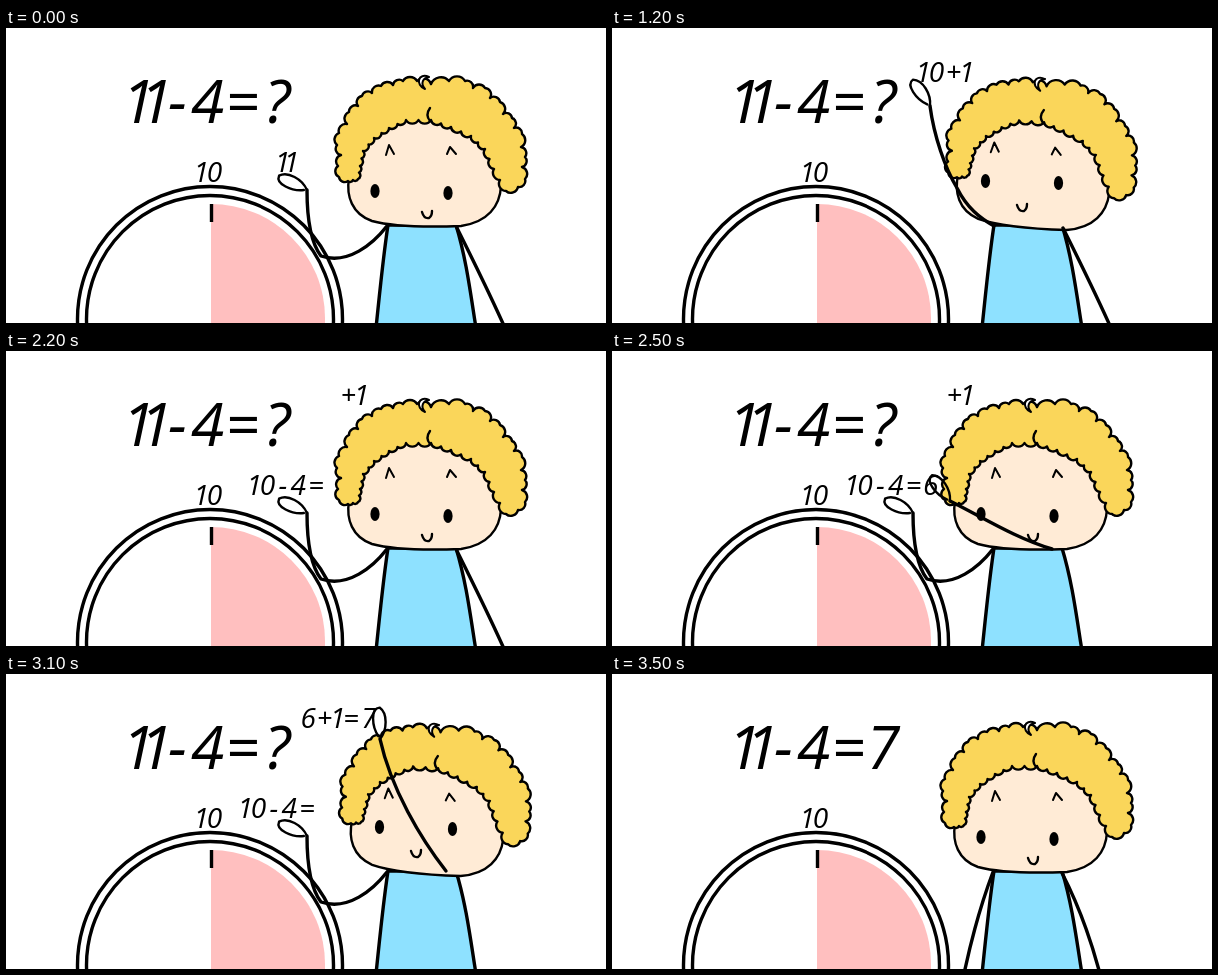
An HTML page for the animation above (4500 ms loop, 600 px wide and 295 px high).

```html
<!DOCTYPE html>
<html lang="en">
<head>
<meta charset="utf-8">
<title>11-4</title>
<style>
html, body { margin: 0; width: 100%; height: 100%; overflow: hidden; background: #fff; }
svg { display: block; width: 100%; height: 100%; }
text { font: italic 28px "Open Sans", "Noto Sans", sans-serif; text-anchor: middle; fill: #000; }
#sum { font-size: 60px; }
.line { fill: none; stroke: #000; stroke-width: 3.4; stroke-linecap: round; stroke-linejoin: round; }
.thin { stroke-width: 2.4; }
</style>
</head>
<body>
<svg viewBox="0 0 600 295">
  <g id="clock">
    <path d="M205 290V176A114 114 0 0 1 319 290V296H205Z" fill="#ffbfbf"/>
    <circle class="line" cx="204" cy="291" r="132.5"/>
    <circle class="line" cx="204" cy="291" r="123.5"/>
    <path class="line" style="stroke-linecap:butt" d="M205.5 176V194"/>
  </g>
  <path class="line" style="fill:#8ee1ff" d="M382 197C377 230 374 262 370 300H470C464 262 460 230 450 197Z"/>
  <g id="head">
    <path class="line thin" style="fill:#ffebd6" d="M343 150C340 168 346 186 366 193C388 199 428 199 455 198C482 194 494 178 495 158C485 105 440 85 415 86C380 88 348 115 343 150Z"/>
    <path id="hair" class="line thin" style="fill:#fad65a"/>
    <path class="line thin" style="fill:#fff;stroke-width:2" d="M423 49C412 44 409 57 419 61C414 55 417 50 423 49"/>
    <path class="line thin" d="M424 80Q419 87 424 93"/>
  </g>
  <g id="eyes">
    <ellipse cx="369" cy="163" rx="4.6" ry="7"/>
    <ellipse cx="442" cy="165" rx="4.6" ry="7"/>
  </g>
  <path id="brows" class="line thin" style="stroke-width:2" d="M380 127L383 117L388 126M441 126L444 119L450 126"/>
  <path id="mouth" class="line thin" d="M416 184Q418 191 423 190Q426 188 426 183"/>
  <g id="leftArm"><path class="line"/><path class="line thin"/></g>
  <g id="rightArm"><path class="line"/><path class="line thin"/></g>
  <text id="sum" y="95"></text>
  <text id="ten" y="154"></text>
  <text id="low" y="144"></text>
  <text id="top" y="54"></text>
</svg>
<script>
const LOOP = 4500;
const $ = id => document.getElementById(id);

// Glyph spacing of the handwriting at the small size.
const advance = { 1: 9, 0: 17.5, '+': 17, '-': 13, 4: 18, '=': 18, 6: 16, 7: 17.5, '?': 17.5 };

function write(el, text, center, scale = 1) {
  const widths = [...text].map(c => advance[c] * scale);
  let x = center - widths.reduce((a, b) => a + b, 0) / 2;
  el.setAttribute('x', widths.map(w => (x += w) - w / 2).join(' '));
  el.textContent = text;
}

// Clockwise chain of round curls through the given points.
function curls(points, steps) {
  let d = '';
  for (let i = 1; i < points.length; i++) {
    const [ax, ay] = points[i - 1], [bx, by] = points[i];
    const r = Math.hypot(bx - ax, by - ay) / steps * 0.58;
    for (let k = 1; k <= steps; k++) {
      d += `A${r} ${r} 0 0 1 ${ax + (bx - ax) * k / steps} ${ay + (by - ay) * k / steps}`;
    }
  }
  return d;
}

const outer = [[342, 153], [333, 149], [332, 138], [335, 127], [331, 117], [333, 105], [341, 96],
  [343, 84], [352, 78], [356, 68], [366, 65], [375, 58], [387, 57], [397, 53], [411, 53], [425, 56],
  [443, 53], [459, 53], [467, 60], [479, 60], [484, 70], [494, 74], [497, 86], [506, 90],
  [508, 100], [516, 106], [515, 119], [519, 129], [516, 139], [519, 151], [512, 159], [500, 163]];
const inner = [[500, 163], [488, 141], [479, 121], [465, 108], [445, 99], [425, 92],
  [400, 92], [383, 100], [368, 110], [357, 123], [354, 138], [352, 151], [342, 153]];
$('hair').setAttribute('d', 'M342 153' + curls(outer, 1) + curls(inner, 2) + 'Z');

// Each arm: its stroke, then the hand's place and angle.
const hand = 'M0 0C-8-9-24-12-31-5C-32 4-14 6-3 1';
const arms = {
  hold: ['M301 162C301 190 305 215 315 228C342 237 367 216 381 198', 301, 162, 18],
  raise: ['M318 78C322 108 333 140 345 160C355 180 368 190 382 198', 318, 78, 48],
  grab: ['M320 76C323 108 333 140 345 160C355 180 368 190 382 198', 320, 76, 52],
  leftDown: ['M381 198C369 230 360 262 352 300'],
  rest: ['M451 200C466 230 482 262 499 300'],
  rightDown: ['M450 199C466 230 478 262 488 300'],
  takeSix: ['M440 198C405 188 370 166 338 150', 338, 150, 46],
  liftSix: ['M440 198C405 168 370 118 343 83', 343, 83, 71],
  takeSeven: ['M440 197C415 165 385 115 374 65', 374, 65, 80],
  placeSeven: ['M440 198C400 175 345 130 303 99', 303, 99, 48]
};

function setArm(group, name) {
  const [d, x, y, angle] = arms[name];
  const [limb, palm] = group.children;
  limb.setAttribute('d', d);
  palm.setAttribute('d', x ? hand : '');
  if (x) palm.setAttribute('transform', `translate(${x} ${y}) rotate(${angle})`);
}

function setHead(tilted) {
  const move = (id, value) => $(id).setAttribute('transform', tilted ? value : '');
  move('head', 'translate(3 2) rotate(4 425 150)');
  move('eyes', 'translate(4.5 -10)');
  move('brows', 'translate(-1 -1) rotate(3 413 122)');
  move('mouth', 'translate(-11 -7)');
}

// start, lower text, its center, upper text, its center, left arm, right arm, tilted, answer
const scenes = [
  [0, '11', 281, '', 0, 'hold', 'rest', false, '?'],
  [500, '10', 281, '', 0, 'hold', 'rest', false, '?'],
  [600, '10+', 281, '', 0, 'hold', 'rest', false, '?'],
  [700, '10+1', 281, '', 0, 'hold', 'rest', false, '?'],
  [1200, '', 0, '10+1', 333, 'raise', 'rest', true, '?'],
  [1300, '', 0, '10+1', 333, 'grab', 'rest', true, '?'],
  [1800, '10', 281, '+1', 347, 'hold', 'rest', false, '?'],
  [2000, '10-', 281, '+1', 347, 'hold', 'rest', false, '?'],
  [2100, '10-4', 281, '+1', 347, 'hold', 'rest', false, '?'],
  [2200, '10-4=', 281.5, '+1', 347, 'hold', 'rest', false, '?'],
  [2300, '10-4=6', 281, '+1', 347, 'hold', 'rest', false, '?'],
  [2500, '10-4=6', 281, '+1', 347, 'hold', 'takeSix', false, '?'],
  [2700, '10-4=', 272.5, '6+1', 338.5, 'hold', 'liftSix', true, '?'],
  [2900, '10-4=', 272.5, '6+1=7', 333, 'hold', 'liftSix', true, '?'],
  [3100, '10-4=', 272.5, '6+1=7', 333, 'hold', 'takeSeven', true, '?'],
  [3300, '10-4=', 272.5, '6+1=', 324.5, 'hold', 'placeSeven', false, '7'],
  [3500, '', 0, '', 0, 'leftDown', 'rightDown', false, '7']
];

function show([, low, lowX, top, topX, left, right, tilted, answer]) {
  write($('low'), low, lowX);
  write($('top'), top, topX);
  write($('sum'), '11-4=' + answer, 206, 1.95);
  setArm($('leftArm'), left);
  setArm($('rightArm'), right);
  setHead(tilted);
}

write($('ten'), '10', 204);
const start = performance.now();
let current;
function tick() {
  const time = (performance.now() - start) % LOOP;
  const scene = scenes.findLast(s => s[0] <= time);
  if (scene !== current) show(current = scene);
  requestAnimationFrame(tick);
}
tick();
</script>
</body>
</html>
```
